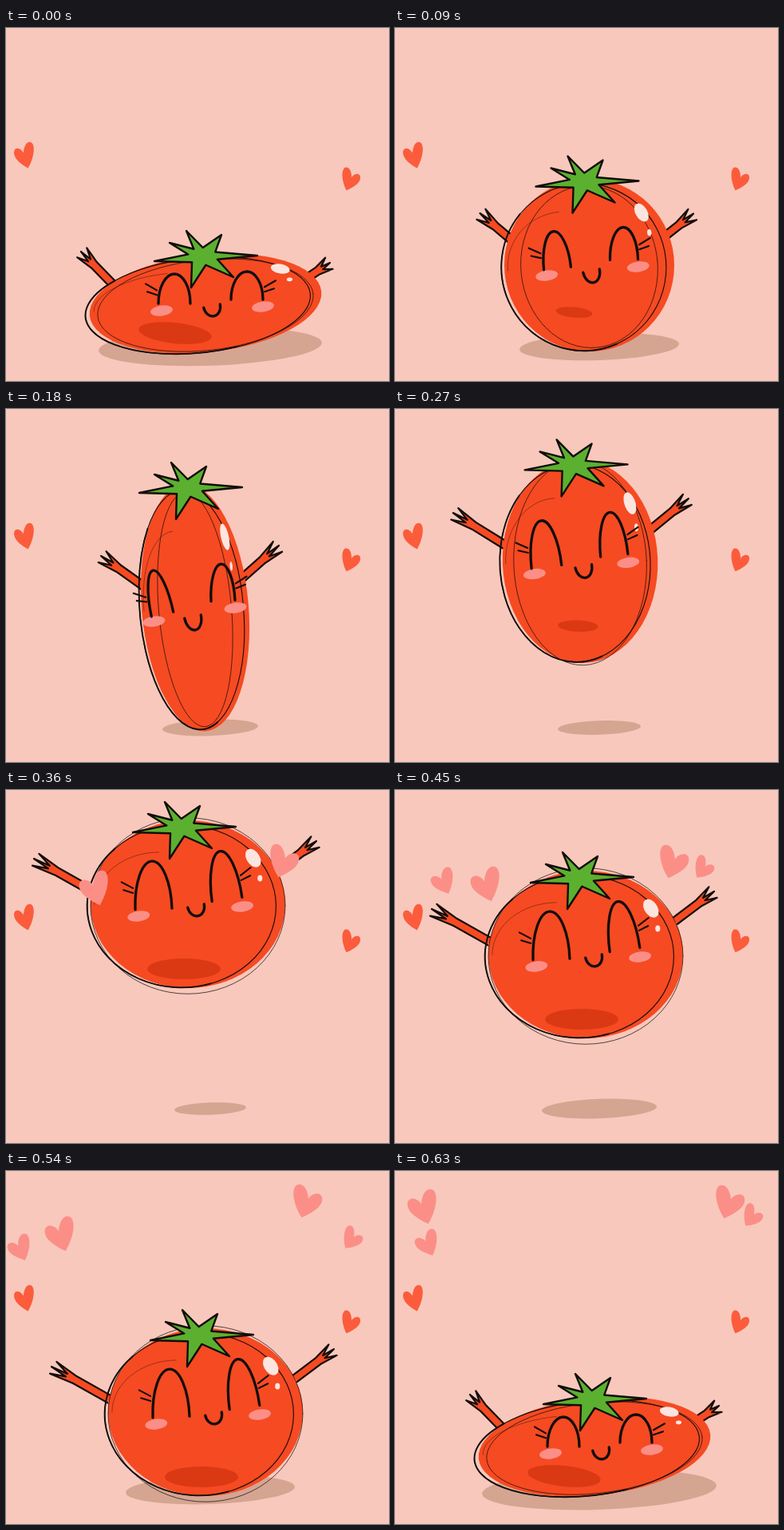
Animation, 480 px wide and 442 px high, one loop 0.72 s. Source, as an HTML page with a canvas:

```html
<!DOCTYPE html>
<html lang="en">
<head>
<meta charset="utf-8">
<title>Jumping tomato</title>
<style>
  html, body { margin: 0; height: 100%; overflow: hidden; background: #f8c8bc; }
  canvas { display: block; width: 480px; height: 442px; }
</style>
</head>
<body>
<canvas id="stage" width="480" height="442"></canvas>
<script>
const ctx = document.getElementById('stage').getContext('2d');
const SKY = '#f8c8bc', INK = '#120d0a', RED = '#f64a22', PINK = '#fb8f87', CORAL = '#fc5c3c';
const STEP = 90, APPEAR = 4;
const rad = deg => deg * Math.PI / 180;

// body and eyes: x, y, half width, height, tilt. mouth: x, y, depth.
// arms: shoulder to fingertip. belly: x, y, scale.
const round = {
  body: [228, 143, 122, 105, 0], loose: [1, 1.05],
  eyes: [[185, 149, 23, 60, -2], [277, 137, 19, 61, -8]], mouth: [238, 145, 13],
  arms: [[108, 127, 35, 86], [340, 101, 389, 64]],
  belly: [223, 224, 1], stem: [0, 0]
};
const flat = {
  body: [250, 345, 146, 61, -6], loose: [.93, .93],
  eyes: [[211, 345, 20, 37, 0], [302, 340, 20, 35, 0]], mouth: [258, 348, 13],
  arms: [[135, 322, 94, 280], [368, 319, 406, 294]],
  belly: [212, 382, 1], stem: [27, 239]
};
const tall = {
  body: [237, 249, 67, 155, -5], loose: [.68, .95],
  eyes: [[196, 257, 14, 56, -12], [272, 240, 15, 46, -3]], mouth: [234, 260, 17],
  arms: [[174, 223, 119, 184], [290, 217, 342, 171]],
  belly: [237, 330, 0], stem: [8, 52]
};

function mix(a, b, k) {
  if (typeof a === 'number') return a + (b - a) * k;
  if (Array.isArray(a)) return a.map((v, i) => mix(v, b[i], k));
  return Object.fromEntries(Object.keys(a).map(key => [key, mix(a[key], b[key], k)]));
}

// While falling, the round pose drops along `fall`.
const fall = k => [11 * k, 63 * k + 16.5 * k * (k - 1)];
const scenes = [
  { pose: flat, shadow: 140 },
  { pose: mix(flat, tall, .5), shadow: 100 },
  { pose: tall, shadow: 60 },
  { pose: mix(tall, round, .55), shadow: 52 },
  { pose: round, shadow: 45 },
  { pose: round, shift: fall(1), shadow: 72 },
  { pose: round, shift: fall(2), shadow: 106 },
  { pose: flat, shadow: 147 }
];

// Each loose heart visits one point per step from its first step on.
const hearts = [
  { first: 0, size: [19, 21], tilt: -13, path: [[112, 124], [115, 119], [69, 80], [36, 46]] },
  { first: 1, size: [15, 16], tilt: -20, path: [[61, 115], [18, 97], [41, 91]] },
  { first: 0, size: [19, 20], tilt: 13, path: [[347, 90], [348, 91], [376, 39], [418, 40]] },
  { first: 1, size: [13, 14], tilt: 30, path: [[386, 98], [433, 85], [447, 57]] }
];

function fill(color) {
  ctx.fillStyle = color;
  ctx.fill();
}
function ink(width, alpha = 1) {
  ctx.globalAlpha = alpha;
  ctx.lineWidth = width;
  ctx.strokeStyle = INK;
  ctx.stroke();
  ctx.globalAlpha = 1;
}
function oval(x, y, rx, ry, deg = 0, from = 0, to = 2) {
  ctx.beginPath();
  ctx.ellipse(x, y, rx, ry, rad(deg), from * Math.PI, to * Math.PI);
}
function poly(points) {
  ctx.beginPath();
  points.forEach(p => ctx.lineTo(...p));
}
function within(x, y, deg, paint) {
  ctx.save();
  ctx.translate(x, y);
  ctx.rotate(rad(deg));
  paint();
  ctx.restore();
}

function heart(x, y, [w, h], tilt, color) {
  within(x, y, tilt, () => {
    ctx.scale(tilt < 0 ? w : -w, h);
    ctx.beginPath();
    ctx.moveTo(.05, 1);
    ctx.bezierCurveTo(-.5, .6, -1.1, .1, -1, -.4);
    ctx.bezierCurveTo(-.9, -.85, -.3, -.75, -.1, -.25);
    ctx.bezierCurveTo(.1, -.85, .5, -1.15, .85, -.92);
    ctx.bezierCurveTo(1.2, -.55, .7, .4, .05, 1);
    fill(color);
  });
}

function arm([x, y, tx, ty]) {
  const len = Math.hypot(tx - x, ty - y), h = 5;
  const top = [[0, -h], [.6 * len, -h], [.97 * len, -1.7 * h], [.74 * len, -.4 * h]];
  const low = top.map(([u, v]) => [u, -v]).reverse();
  within(x, y, Math.atan2(ty - y, tx - x) * 180 / Math.PI, () => {
    poly([...top, [len, 0], ...low]);
    fill(RED);
    ink(2.2);
  });
}

function body({ body: [x, y, rx, ry, deg], loose: [sx, sy], belly }) {
  oval(x, y, rx, ry, deg);
  fill(RED);
  oval(belly[0], belly[1], 46 * belly[2], 13 * belly[2], -deg);
  fill('#da3913');

  oval(x, y + 2, rx * sx, ry * sy, deg);
  ink(.9, .8);
  oval(x - .3 * rx, y, .66 * rx, .62 * ry, deg, 1, 1.5);
  ink(.8, .5);
  const edge = [x - .065 * rx, y + 2.5, .97 * rx, .97 * ry, deg];
  oval(...edge);
  ink(1.1);
  oval(...edge, .4, 1.25);
  ink(1.9);

  // The highlights stretch with the body.
  within(x, y, deg, () => {
    ctx.scale(rx, ry);
    oval(.67, -.55, .07, .115, -25);
    fill('#fde5df');
    oval(.74, -.31, .025, .038);
    fill('#fde5df');
  });
}

function eye([x, y, w, h, deg], side) {
  oval(x + side * .9 * w + 2, y + 9, 14, 6.5, -8);
  fill(PINK);
  within(x, y, deg, () => {
    oval(0, 0, w, h, 0, 1, 2);
    ink(3.3);
    for (const i of [0, 1]) {
      const u = side * (w + 2), v = 6 * i - .45 * h;
      poly([[u, v], [u + side * (14 - 2 * i), v - 8 + 4 * i]]);
      ink(2.1);
    }
  });
}

function stem([x, y]) {
  const tips = [[159, 52], [178, 29], [199, 14], [243, 19], [288, 45], [258, 72], [205, 85]];
  const center = [219, 45];
  const star = tips.flatMap((tip, i) => {
    const next = tips[(i + 1) % tips.length];
    return [tip, mix(center, mix(tip, next, .5), .35)];
  });
  within(x, y + 1, 0, () => {
    poly(star);
    ctx.closePath();
    fill('#5bb030');
    ink(2.4);
  });
}

function tomato(pose) {
  pose.arms.forEach(arm);
  body(pose);
  pose.eyes.forEach((e, i) => eye(e, i ? 1 : -1));
  const [x, y, depth] = pose.mouth;
  oval(x, y, 10.5, depth, -12, 0, 1);
  ink(3.3);
  stem(pose.stem);
}

function draw(now) {
  const step = Math.floor(now / STEP) % scenes.length;
  const { pose, shift = [0, 0], shadow } = scenes[step];
  ctx.fillStyle = SKY;
  ctx.fillRect(0, 0, 480, 442);
  oval(256, 399, shadow, .17 * shadow, -2);
  fill('#d5a592');
  within(...shift, 0, () => tomato(pose));

  heart(24, 160, [13, 16], -11, CORAL);
  heart(431, 190, [12, 14], 16, CORAL);
  for (const { first, size, tilt, path } of hearts) {
    const spot = path[step - APPEAR - first];
    if (spot) heart(...spot, size, tilt, PINK);
  }
}

ctx.lineCap = ctx.lineJoin = 'round';
const start = performance.now();
function tick() {
  draw(performance.now() - start);
  requestAnimationFrame(tick);
}
tick();
</script>
</body>
</html>
```
